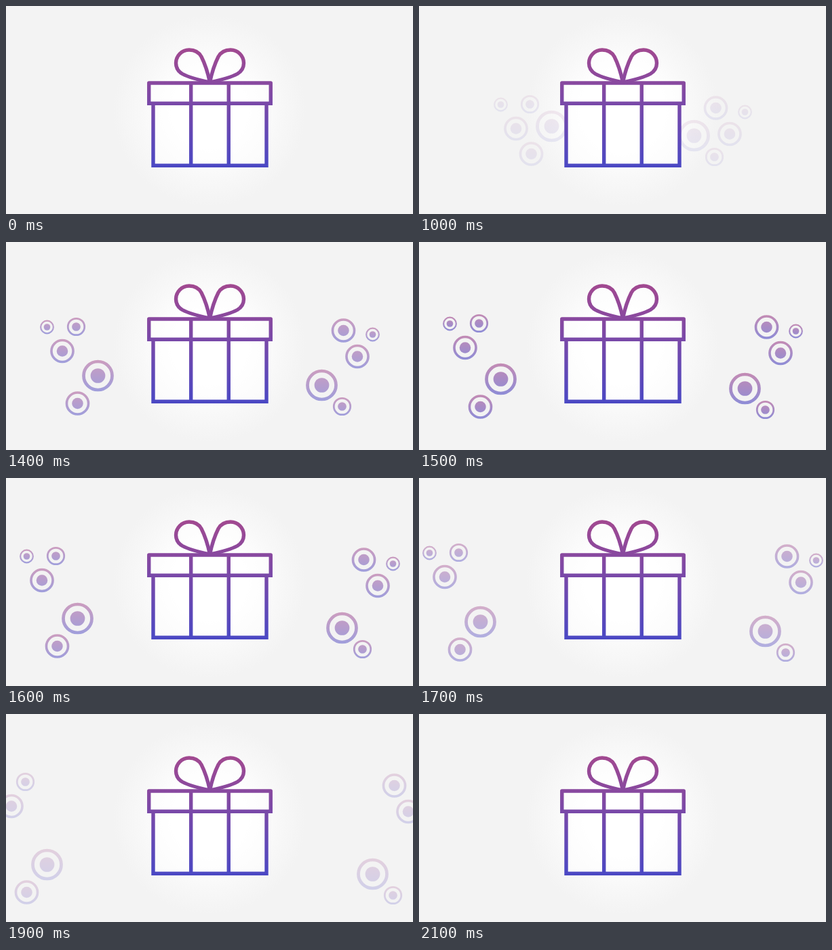
Animation of 600 by 308 pixels, one loop 2200 ms. Source, as an HTML page:

```html
<!DOCTYPE html>
<html lang="en">
<head>
<meta charset="utf-8">
<title>Gift</title>
<style>
  html, body { margin: 0; width: 100%; height: 100%; overflow: hidden; background: #f3f3f3; }
  svg { display: block; width: 600px; height: 308px; }
</style>
</head>
<body>
<svg viewBox="0 0 600 308">
  <defs>
    <radialGradient id="glow" gradientUnits="userSpaceOnUse" cx="300" cy="155" r="142">
      <stop offset=".4" stop-color="#fff"/>
      <stop offset=".72" stop-color="#f8f8f8"/>
      <stop offset="1" stop-color="#f3f3f3"/>
    </radialGradient>
    <linearGradient id="ink" gradientUnits="userSpaceOnUse" x1="0" y1="62" x2="0" y2="239">
      <stop offset="0" stop-color="#a24990"/>
      <stop offset="1" stop-color="#4a48c4"/>
    </linearGradient>
    <linearGradient id="coinInk" gradientUnits="userSpaceOnUse" x1="0" y1="-1" x2="0" y2="1">
      <stop offset="0" stop-color="#a5468a"/>
      <stop offset="1" stop-color="#4a48c4"/>
    </linearGradient>
    <g id="coin">
      <circle r=".89" fill="none" stroke="url(#coinInk)" stroke-width=".2"/>
      <circle r=".46" fill="url(#coinInk)"/>
    </g>
    <path id="loop" d="M300.5 113Q296 91 288 75C284 68 278 65 270 65C259 65 250.500 74 250.500 84.500C250.500 91 254 97 260 100.500Q272 107 300.500 113"/>
  </defs>

  <rect width="600" height="308" fill="url(#glow)"/>
  <g id="coins"></g>

  <g fill="#fff" fill-opacity=".5" stroke="url(#ink)" stroke-width="5.4">
    <path d="M217 144V236.250H384V144"/>
    <path d="M210.750 147V114H390.250V147M210.750 144.250H390.250" stroke-linejoin="round"/>
    <path d="M272.700 114V236M328.250 114V236" fill="none"/>
    <use href="#loop"/>
    <use href="#loop" transform="matrix(-1 0 0 1 601 0)"/>
  </g>
</svg>
<script>
  const LOOP = 2200, STEP = 100, START = 1000;
  const MIDDLE = 300.5, DX = 15, DY = 5;
  const radius = size => 10.5 * 1.31 ** size;

  // Coins in near-mirrored pairs: distance from the middle, then [left, right] heights and sizes
  const pairs = [
    { away: 180, y: [146, 157], size: [0, 0] },
    { away: 137, y: [145.5, 151], size: [1, 2] },
    { away: 157.5, y: [181.5, 189.5], size: [2, 2] },
    { away: 105, y: [178, 192], size: [3, 3] },
    { away: 135, y: [219, 223.5], size: [2, 1] }
  ];

  const layer = document.getElementById("coins");
  const coins = pairs.flatMap(({ away, y, size }, i) => [-1, 1].map((side, j) => {
    const node = document.createElementNS("http://www.w3.org/2000/svg", "use");
    node.setAttribute("href", "#coin");
    layer.append(node);
    // The upper three pairs rise, the others sink
    return { node, side, x: MIDDLE + side * away, y: y[j], r: radius(size[j]), drift: i < 3 ? -1 : 1 };
  }));

  function draw(time) {
    const k = Math.floor((time % LOOP - START) / STEP);
    // Fade in over six steps, then out over five
    layer.style.opacity = Math.max(0, Math.min(k + 1, 11 - k) / 10);
    for (const { node, side, x, y, r, drift } of coins) {
      node.setAttribute("transform",
        `translate(${x + side * DX * k} ${y + drift * DY * k}) scale(${r})`);
    }
  }

  const begin = performance.now();
  function tick() {
    draw(performance.now() - begin);
    requestAnimationFrame(tick);
  }
  tick();
</script>
</body>
</html>
```
